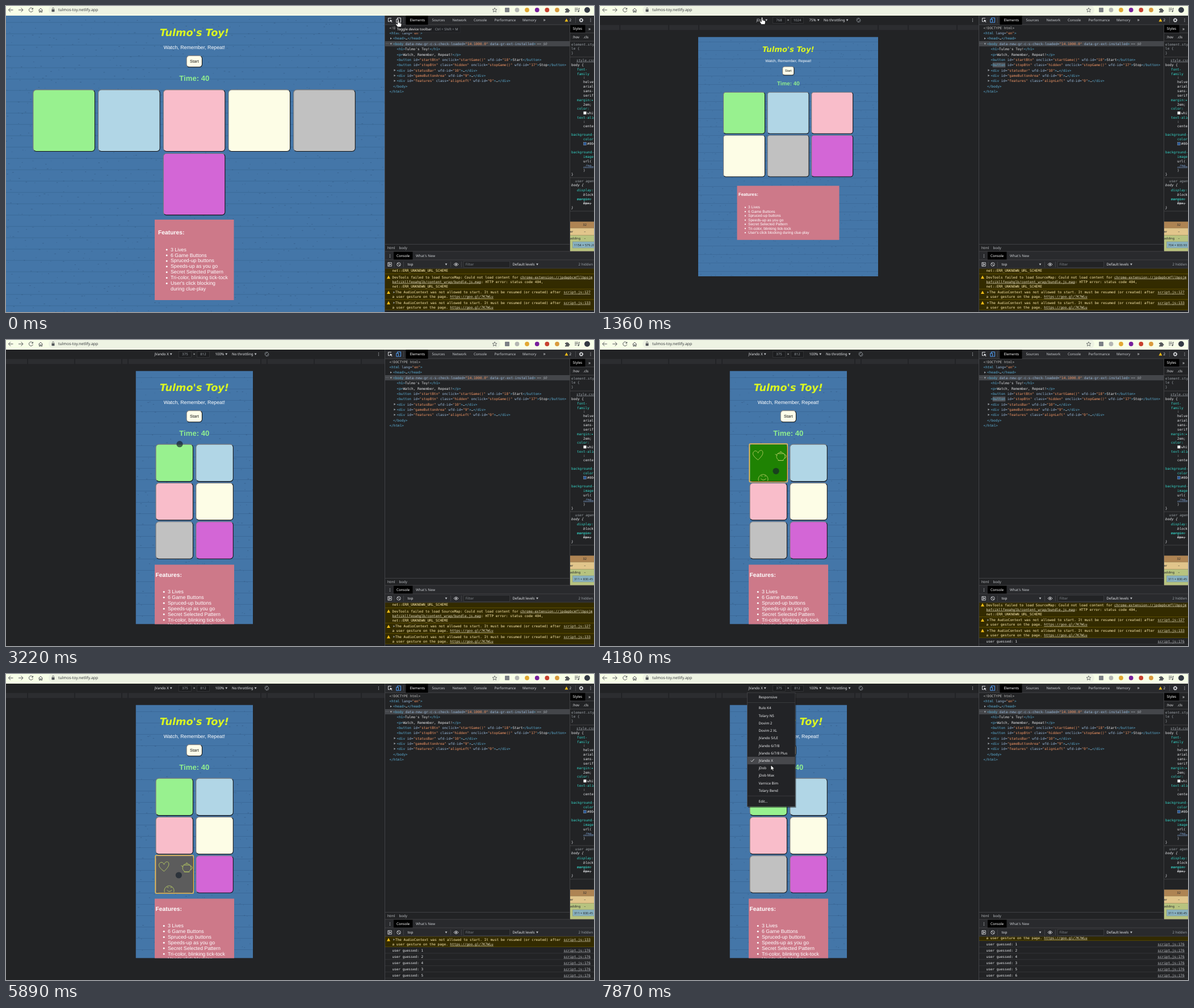
An HTML page for the animation above (7990 ms loop, 1036 px wide and 540 px high).

```html
<!DOCTYPE html>
<html lang="en">
<head>
<meta charset="utf-8">
<title>Responsive toy</title>
<style>
html, body { margin: 0; width: 100%; height: 100%; overflow: hidden; background: #222325; }
svg { display: block; }
text { white-space: pre; text-rendering: geometricPrecision; }
.ui { font-family: "Noto Sans", "Open Sans", sans-serif; }
.mono { font-family: "DejaVu Sans Mono", monospace; }
.page { font-family: "Liberation Sans", Arial, sans-serif; }
.title { font: italic bold 17.6px "DejaVu Sans", sans-serif; }
</style>
</head>
<body>
<svg id="stage" width="1036" height="540" viewBox="0 0 1036 540">
  <defs>
    <linearGradient id="edge" x1="0" y1="0" x2="1" y2="1">
      <stop offset=".5" stop-color="#77777a"/><stop offset=".5" stop-color="#101216"/>
    </linearGradient>
  </defs>
</svg>
<script>
const LOOP = 7990, BG = '#222325', BAR = '#292a2d', LINE = '#47484b', GREY = '#9aa0a6', LIGHT = '#e6e8eb';
const stage = document.getElementById('stage');

function el(tag, attrs, parent = stage) {
  const n = document.createElementNS('http://www.w3.org/2000/svg', tag);
  for (const k in attrs) n.setAttribute(k, attrs[k]);
  return parent.appendChild(n);
}
const group = (parent, attrs = {}) => el('g', attrs, parent);
const rect = (p, x, y, width, height, fill, more) => el('rect', { x, y, width, height, fill, ...more }, p);
const line = (p, d, stroke, w = .8, more) => el('path', { d, stroke, 'stroke-width': w, fill: 'none', ...more }, p);
const shape = (p, d, fill, more) => el('path', { d, fill, ...more }, p);
const dot = (p, cx, cy, r, fill, more) => el('circle', { cx, cy, r, fill, ...more }, p);
// y is the middle of the line of text
function text(p, x, y, str, size, fill, more) {
  const t = el('text', { x, y: y + size * .355, 'font-size': size, fill, ...more }, p);
  t.textContent = str;
  return t;
}
const ui = (p, x, y, str, fill = LIGHT, size = 6.2, more) => text(p, x, y, str, size, fill, { class: 'ui', ...more });
const mono = (p, x, y, str, fill, more) => text(p, x, y, str, 6.05, fill, { class: 'mono', ...more });
const caret = (p, x, y) => shape(p, `M${x - 1.9} ${y - 1.6}h3.8l-1.9 3.4z`, '#c4c7cb');
const dots = (p, x, y, c = '#b8bbbf') => [-2.4, 0, 2.4].forEach(d => dot(p, x, y + d, .7, c));
const show = (n, on) => n.setAttribute('visibility', on ? 'inherit' : 'hidden');
function random(seed) {
  return () => (seed = seed * 16807 % 2147483647) / 2147483647;
}

// ---------- the toy page ----------
const COLORS = ['#98f18f', '#b1d6e6', '#f9bdca', '#fdfde6', '#c1c1c1', '#d366d6'];
const PRESSED = ['#1f8203', '#2b35ff', '#f5202c', '#fbff14', '#5c5c5c', '#8c0a92'];
const FEATURES = ['3 Lives', '6 Game Buttons', 'Spruced-up buttons', 'Speeds-up as you go',
  'Secret Selected Pattern', 'Tri-color, blinking tick-tock'];
const BLOCK = ["User's click blocking", 'during clue-play'];

const PAGES = [
  { x: 0, y: 17, w: 667.5, h: 523, s: 1, rows: [46.5, 73, 97.7, 127], size: 109.6,
    cell: i => i < 5 ? [47.4 + 114.7 * i, 147.4] : [276.8, 259.8],
    box: [262, 377, 139.5, 142], head: [268, 399.3], list: [290, 429.5], end: BLOCK },
  { x: 173, y: 54.5, w: 317, h: 422.5, s: .75, rows: [76.2, 96.3, 114.5, 136.3], size: 74,
    cell: i => [217 + 77.6 * (i % 3), 151.7 + 76 * (i / 3 | 0)],
    box: [241.5, 317.3, 180, 95.5], head: [244, 332], list: [261, 355], end: [BLOCK.join(' ')] },
  { x: 228.5, y: 54.5, w: 206.5, h: 447, s: 1, rows: [83.5, 110, 134.7, 164], size: 66.5,
    cell: i => [263.5 + 70.8 * (i % 2), 183.6 + 68.3 * (i >> 1)],
    box: [262, 396.5, 140, 130], head: [263.5, 414], list: [285, 443.8], end: BLOCK }
];

function wood(p, { x, y, w, h, s }) {
  const rnd = random(77), gap = 20 * s;
  let grain = '', specks = '';
  for (let ly = y + gap * .6; ly < y + h; ly += gap) {
    grain += `M${x} ${ly}h${w}`;
    for (let lx = x + rnd() * 12; lx < x + w; lx += (3 + rnd() * 22) * s) {
      const len = (.5 + rnd() * 2.5) * s;
      specks += `M${lx.toFixed(1)} ${(ly + (rnd() - .35) * gap * .8).toFixed(1)}h${len.toFixed(1)}`;
    }
  }
  line(p, grain, '#2c527c', .7 * s, { opacity: .5 });
  line(p, specks, '#2a4a72', .8 * s, { opacity: .55 });
}

function slab(p, x, y, w, h, r, fill) {
  return rect(p, x + .5, y + .5, w - 1, h - 1, fill, { rx: r, stroke: 'url(#edge)', 'stroke-width': 1.1 });
}

function doodles(p, x, y, c) {
  const g = group(p, { transform: `translate(${x} ${y})`, stroke: c, 'stroke-width': .9, fill: 'none' });
  el('path', { d: 'M15 28C8 23 4 18 7 14c3-4 7-1 8 2 1-4 6-7 8-3 2 5-3 10-8 15z' }, g);
  el('path', { d: 'M49 17h12c3 6 1 9-3 12h-6c-4-3-6-6-3-12zM49 20l-4-2M61 19c5-1 5 6 0 6M50 17c1-3 9-3 10 0M54 14a1 1 0 0 1 2 0M50 29h10' }, g);
  el('path', { d: 'M16 65a8.5 8.5 0 1 1 16 0M20 57q1-2 3 0M26 57q1-2 3 0M20 61q4 5 9 0' }, g);
}

function buildPage(o) {
  const root = group(stage);
  const p = group(el('svg', { x: o.x, y: o.y, width: o.w, height: o.h, viewBox: `${o.x} ${o.y} ${o.w} ${o.h}` }, root), { class: 'page' });
  const { s, rows } = o, mid = { 'text-anchor': 'middle' }, cx = 331.8;
  rect(p, o.x, o.y, o.w, o.h, '#4476a8');
  wood(p, o);
  const t = el('text', { class: 'title', x: 0, y: 0, fill: '#dbf722', ...mid,
    transform: `translate(${cx} ${rows[0] + 6.4 * s}) scale(${s})` }, p);
  t.textContent = "Tulmo's Toy!";
  text(p, cx, rows[1], 'Watch, Remember, Repeat!', 8.8 * s, '#fff', mid);
  slab(p, cx - 14.2 * s, rows[2] - 10.6 * s, 28.4 * s, 21.2 * s, 5 * s, '#fefeea');
  text(p, cx, rows[2], 'Start', 7.33 * s, '#111', mid);
  text(p, cx, rows[3], 'Time: 40', 13.1 * s, '#90ee90', { 'font-weight': 'bold', ...mid });
  const cells = COLORS.map((c, i) => {
    const [x, y] = o.cell(i), n = o.size;
    slab(p, x, y, n, n, 5.5 * s, c);
    const hot = group(p), focus = group(p);
    if (o === PAGES[2]) {
      rect(hot, x + 1, y + 1, n - 2, n - 2, PRESSED[i], { rx: 3 });
      doodles(hot, x, y, i === 3 ? '#e6dc2c' : '#b7cb62');
      rect(focus, x - .3, y - .3, n + .6, n + .6, 'none', { rx: 1.5, stroke: '#f3bd4c', 'stroke-width': 1.5 });
    }
    return { hot, focus };
  });
  rect(p, ...o.box, '#cd7989');
  text(p, ...o.head, 'Features:', 10.3 * s, '#fff', { 'font-weight': 'bold' });
  [...FEATURES, ...o.end].forEach((f, i) => {
    const y = o.list[1] + i * 9.92 * s;
    text(p, o.list[0], y, f, 8.8 * s, '#fff');
    if (i < 7) dot(p, o.list[0] - 6.8 * s, y + .6 * s, 1.5 * s, '#fff');
  });
  return { root, cells };
}

// ---------- device toolbar ----------
function deviceBar(name, nameX, size, zoom, zoomX, throttleX, iconX, ticks) {
  const g = group(stage);
  rect(g, 0, 17, 667.5, 16, BG);
  rect(g, 0, 33.5, 667.5, 8.8, '#2c2d30');
  ticks.forEach(d => line(g, `M${332 - d} 33.5v8.8M${332 + d} 33.5v8.8`, '#191a1c', 1));
  const drop = (x, str) => {
    const t = ui(g, x, 25, str);
    caret(g, x + t.getComputedTextLength() + 4, 25);
  };
  drop(nameX, name);
  size.forEach((n, i) => {
    rect(g, 304.5 + 32 * i, 20, 22, 10.5, '#1c1d1f', { stroke: '#3a3b3e', 'stroke-width': .7 });
    ui(g, 315.5 + 32 * i, 25.2, n, GREY, 6, { 'text-anchor': 'middle' });
  });
  ui(g, 329.8, 25.2, '×', LIGHT, 6.2);
  drop(zoomX, zoom);
  drop(throttleX, 'No throttling');
  rect(g, iconX - 1.7, 22, 3.4, 6, 'none', { stroke: GREY, 'stroke-width': .8, transform: `rotate(45 ${iconX} 25)` });
  dot(g, iconX, 25, 3.7, 'none', { stroke: GREY, 'stroke-width': .7, 'stroke-dasharray': '7 4.6' });
  dots(g, 656.5, 25);
  return g;
}

// ---------- browser bar ----------
function browserBar() {
  const p = group(stage), ink = '#54575a';
  rect(p, 0, 0, 1036, 17, '#f8ffe8');
  rect(p, 75, -.7, 796, 15.4, '#eef3e3', { rx: 7.7 });
  line(p, 'M12.5 7H4.5M8 3.4L4.4 7 8 10.6M22 7h8M26.5 3.4L30.1 7 26.5 10.6', ink, 1);
  line(p, 'M47 4.8A3.6 3.6 0 1 0 47.5 8M47.5 3.4v2.4h-2.4M57.5 7.5L61 4l3.5 3.5M58.6 7v4h1.7V8.5h1.6V11h1.7V7', ink, 1);
  rect(p, 80.5, 6, 5, 4.2, ink, { rx: .6 });
  line(p, 'M81.6 6V4.5a1.4 1.4 0 0 1 2.8 0V6', ink, .8);
  ui(p, 92, 7, 'tulmos-toy.netlify.app', '#3a3d40', 6.9);
  line(p, 'M861 3.2l1.1 2.6 2.8.2-2.1 1.8.7 2.8-2.5-1.5-2.5 1.5.7-2.8-2.1-1.8 2.8-.2z', ink, .8);
  rect(p, 879, 3, 8, 8, '#7d8186', { rx: 1 });
  dot(p, 900.5, 7, 3.9, '#b4b6b3');
  dot(p, 918, 7, 3.9, '#e2a832');
  dot(p, 935.7, 7, 3.9, '#78209c');
  dot(p, 953.3, 7, 3.9, '#c8412f');
  dot(p, 971, 7, 3.9, '#d99a3d');
  shape(p, 'M985 5h2.2a1.3 1.3 0 1 1 2.6 0h2v2.1a1.3 1.3 0 1 1 0 2.5V11.500h-6.800V9.600a1.300 1.300 0 1 0 0-2.500z', ink);
  line(p, 'M1002 4h6M1002 6.5h6M1002 9h3.5M1009.5 4v5.5M1009.5 4h1.5', ink, 1);
  dot(p, 1008.5, 9.5, 1.2, ink);
  dot(p, 1024, 7, 5, '#343a44');
}

// ---------- developer tools ----------
const TREE = [
  [675.5, '<html lang="en">'], [682, '<head>…</head>', 1],
  [682, '<body data-new-gr-c-s-check-loaded="14.1000.0" data-gr-ext-installed>', 2],
  [688.5, "<h1>Tulmo's Toy!</h1>"], [688.5, '<p>Watch, Remember, Repeat!</p>'],
  [688.5, '<button id="startBtn" onclick="startGame()" wfd-id="18">Start</button>'],
  [688.5, '<button id="stopBtn" class="hidden" onclick="stopGame()" wfd-id="17">Stop</button>'],
  [688.5, '<div id="statusBar" wfd-id="10">…</div>', 1], [688.5, '<div id="gameButtonArea" wfd-id="9">…</div>', 1],
  [688.5, '<div id="features" class="alignLeft" wfd-id="0">…</div>', 1],
  [682, '</body>'], [675.5, '</html>']
];

function markup(p, x, y, src) {
  const t = mono(p, x, y, '', LIGHT);
  src.split(/("[^"]*"|<\/?\w+|>|[\w-]+(?==)|data-gr-ext\S*(?=>))/).forEach((s, i) => {
    if (!s) return;
    const fill = i % 2 === 0 ? (s === '=' ? '#9bbbdc' : LIGHT) : s[0] === '"' ? '#f29766' : /[<>]/.test(s) ? '#5db0d7' : '#9bbbdc';
    el('tspan', { fill }, t).textContent = s;
  });
}

function stylesPane(p) {
  const cyan = '#35d4c7', it = { 'font-style': 'italic' }, cut = { ...it, 'text-decoration': 'line-through' };
  const under = { 'text-decoration': 'underline' };
  const put = (x, y, rows, fill, more) => rows.forEach((s, i) => mono(p, x, y + i * 7.85, s, fill, more));
  line(p, 'M993.5 33v399M993 47.5h43M993 62h43M993 90h43M993 303h43M993 362h43', LINE, .8);
  rect(p, 994, 33.5, 26.5, 13.5, '#000');
  ui(p, 998.5, 40.2, 'Styles', '#fff');
  ui(p, 1026, 40, '»', LIGHT, 8);
  ui(p, 998, 54.8, ':hov');
  ui(p, 1017, 54.8, '.cls');
  put(996, 67.5, ['element.sty', 'le {', '}'], GREY);
  mono(p, 1005, 95.5, 'style.css:1', GREY, under);
  put(996, 103.5, ['body {'], LIGHT);
  put(1006, 112, ['font-', 'family'], cyan);
  put(1017, 126.3, [':', 'helvetica', 'arial,', 'sans-', 'serif;'], LIGHT);
  put(1006, 166, ['margin:▸'], cyan);
  put(1017, 173.7, ['2em;'], LIGHT);
  put(1006, 181, ['color:'], cyan);
  rect(p, 1017.5, 186.3, 5, 5, '#fff');
  put(1024, 188.7, ['white;'], LIGHT);
  put(1006, 196.5, ['text-align'], cyan);
  put(1017, 204.3, [':', 'center;'], LIGHT);
  put(996, 227.3, ['background-'], cyan);
  put(1017, 235.3, ['color:'], cyan);
  rect(p, 1017.5, 240.5, 5, 5, '#2a5a9a', { stroke: GREY, 'stroke-width': .5 });
  put(1024, 243, ['#004'], LIGHT);
  put(996, 258, ['background-'], cyan);
  put(1017, 266, ['image:'], cyan);
  put(1017, 273.8, ['url('], LIGHT);
  put(1017, 281.7, ['./no…'], '#8fb8f0', under);
  put(1017, 289.5, [')'], LIGHT);
  put(996, 297, ['}'], LIGHT);
  put(1003, 308.5, ['user agent'], GREY, it);
  put(996, 316.3, ['body {'], LIGHT, it);
  put(1006, 324.6, ['display:'], cyan, it);
  put(1017, 332.5, ['block;'], LIGHT, it);
  put(1006, 340.4, ['margin:'], cyan, cut);
  put(1017, 348.2, ['0px;'], LIGHT, cut);
  put(996, 356, ['}'], LIGHT, it);
  const small = (x, y, s) => ui(p, x, y, s, '#26282b', 5.6);
  rect(p, 994, 380.5, 42, 52, '#ae8453');
  rect(p, 994, 392, 42, 41, '#e1c58b');
  rect(p, 994, 404.5, 42, 28, '#b7c37f');
  rect(p, 998.5, 416, 38, 11, '#89b1c0', { stroke: '#7c8f86', 'stroke-width': .6 });
  line(p, 'M994 392h42M994 404.5h42', '#8a7850', .5);
  small(1016.5, 386.5, '32');
  small(993.8, 398.3, 'er');
  small(1018.5, 398.3, '–');
  small(993.8, 410, 'adding');
  small(1018.5, 410, '–');
  return small(1001, 421.7, '');
}

function devTools() {
  const p = group(stage);
  rect(p, 667.5, 17, 368.5, 523, BG);
  rect(p, 667.5, 17, 368.5, 16, BAR);
  line(p, 'M667.5 17v523M668 33h368M700.5 20v10M1003.5 20v10', LINE, .9);
  line(p, 'M679 21.5h-5.5v6h2.5', LIGHT, .9);
  shape(p, 'M676.5 24l4.2 1.7-1.8.8 1.6 2-.8.6-1.6-2-1.3 1.4z', LIGHT);
  const device = group(p, { stroke: GREY, fill: 'none', 'stroke-width': 1 });
  el('path', { d: 'M689.5 23v-2h6v8h-3M687.8 23.5h3.8v5.6h-3.8z' }, device);
  rect(p, 704.5, 17, 39, 16, '#000');
  const tabs = { Elements: 711.5, Sources: 750.5, Network: 786.5, Console: 824, Performance: 860.5, Memory: 910 };
  for (const k in tabs) ui(p, tabs[k], 25, k, k === 'Elements' ? '#fff' : '#c9ccd0');
  ui(p, 946.5, 24.5, '»', LIGHT, 8);
  shape(p, 'M987.5 22l3 5.5h-6z', '#f5bd17');
  ui(p, 992.5, 25, '2');
  dot(p, 1013.5, 25, 2.3, 'none', { stroke: LIGHT, 'stroke-width': 1.3 });
  dot(p, 1013.5, 25, 3.4, 'none', { stroke: LIGHT, 'stroke-width': 1, 'stroke-dasharray': '1.3 1.37' });
  dots(p, 1030, 25);

  rect(p, 668, 62, 325, 9.2, '#44464a');
  ui(p, 668.5, 66, '⋯', GREY, 6);
  mono(p, 675.5, 38.7, '<!DOCTYPE html>', '#c0c0c0');
  const flash = rect(p, 691.8, 99.8, 22.5, 8.6, '#505257');
  TREE.forEach(([x, src, arrow], i) => {
    const y = 48 + i * 9.35;
    if (arrow) shape(p, arrow > 1 ? `M${x - 5.5} ${y - 1.2}h3.6l-1.8 3z` : `M${x - 5} ${y - 1.9}v3.6l3-1.8z`, GREY);
    markup(p, x, y, src);
  });
  mono(p, 935.5, 66.7, '== $0', GREY, { 'font-style': 'italic' });
  const metric = stylesPane(p);

  rect(p, 668, 421, 325, 12, BG);
  line(p, 'M668 420.5h325', LINE);
  ui(p, 672, 427, 'html', '#b9bcc0');
  ui(p, 692.5, 427, 'body', '#b9bcc0');
  rect(p, 668, 433, 368, 15, BAR);
  rect(p, 683, 433.5, 33.5, 14.5, '#000');
  dots(p, 676.5, 441);
  ui(p, 688, 441, 'Console', '#fff');
  ui(p, 722, 441, "What's New", '#c9ccd0');
  rect(p, 668, 448, 368, 15, BAR);
  line(p, 'M668 433h368M668 448h368M668 463h368M684 451v10M700.5 451v10M783.5 451v10M802.5 451v10', LINE);
  line(p, 'M672.8 452.8h6.6v6.4h-6.6zM674.8 452.8v6.4', LIGHT, .8);
  shape(p, 'M676 454.3v3.4l2.4-1.7z', LIGHT);
  dot(p, 692, 456, 3.2, 'none', { stroke: LIGHT, 'stroke-width': .8 });
  line(p, 'M689.8 453.8l4.4 4.4', LIGHT);
  ui(p, 707.5, 456, 'top');
  caret(p, 775.5, 456);
  line(p, 'M789 456q4-5 8 0q-4 5-8 0z', LIGHT);
  dot(p, 793, 456, 1.3, LIGHT);
  rect(p, 806.5, 450.5, 81, 11, BG, { stroke: '#3c3d40', 'stroke-width': .8 });
  ui(p, 809.5, 456, 'Filter', '#80868b');
  ui(p, 892.5, 456, 'Default levels');
  caret(p, 936, 456);
  ui(p, 1008.5, 456, '2 hidden', GREY);
  return { device, flash, metric };
}

function consoleLog() {
  const win = el('svg', { x: 668, y: 463.5, width: 368, height: 76.5, viewBox: '668 463.5 368 76.5' }, stage);
  const p = group(win), warm = '#ffecb0', link = '#e4dcc0', under = { 'text-decoration': 'underline' };
  const warn = (y, h, lines, file) => {
    rect(p, 668, y, 368, h, '#332b00');
    line(p, `M668 ${y}h368M668 ${y + h}h368`, '#665500', .7);
    shape(p, `M674 ${y + 2.8}l3 5.6h-6z`, '#f5bd17');
    lines.forEach((s, i) => mono(p, file && !i ? 686 : 680.5, y + 5.6 + i * 8, s, warm));
    if (!file) return;
    shape(p, `M682.5 ${y + 3.9}v3.6l2.6-1.8z`, GREY);
    mono(p, 982.5, y + 5.6, 'script.js:' + file, link, under);
    mono(p, 782.3, y + 13.6, 'https://goo.gl/7K7WLu', link, under);
  };
  const net = 'net::ERR_UNKNOWN_URL_SCHEME';
  const audio = ['The AudioContext was not allowed to start. It must be resumed (or created) after', 'a user gesture on the page.'];
  warn(445.5, 27.3, ['', '', net]);
  warn(472.8, 26.8, ['DevTools failed to load SourceMap: Could not load content for', '', net]);
  mono(p, 906, 478.4, 'chrome-extension://jpdapbcmfllbpojm', link, under);
  mono(p, 680.5, 486.4, 'kefcikllfeoahglb/content_wrap/bundle.js.map', link, under);
  mono(p, 837.2, 486.4, ': HTTP error: status code 404,', warm);
  warn(499.6, 18.4, audio, 127);
  warn(518, 18.4, audio, 133);
  const rows = [1, 2, 4, 3, 5, 6].map((n, i) => {
    const g = group(p), y = 542.5 + i * 11;
    mono(g, 680.5, y, 'user guessed: ' + n, LIGHT);
    mono(g, 982.5, y, 'script.js:176', '#b9bcc0', under);
    line(g, `M668 ${y + 5.3}h368`, '#3b3c3f', .7);
    return g;
  });
  return { list: p, rows };
}

// ---------- device menu ----------
const DEVICES = ['Rulo K4', 'Tolary N5', 'Dovim 2', 'Dovim 2 XL', 'jVando 5/LE', 'jVando 6/7/8', 'jVando 6/7/8 Plus',
  'jVando X', 'jDob', 'jDob Max', 'Varnice Bim', 'Tolary Bend'];
const ROW = 13.22, rowY = i => 60.2 + i * ROW;

function deviceMenu(x, checked) {
  const g = group(stage);
  rect(g, x + 1.5, 35, 84.5, 201, '#000', { opacity: .4 });
  rect(g, x, 33, 84.5, 201, '#222326', { stroke: '#4a4b4e', 'stroke-width': .7 });
  const hover = rect(g, x + .5, 0, 83.5, 13.2, '#47484c');
  line(g, `M${x} 50.5h84.5M${x} 215.2h84.5`, '#434447', .7);
  ['Responsive', ...DEVICES, 'Edit…'].forEach((s, i) =>
    ui(g, x + 20, i === 0 ? 41.2 : i === 13 ? 225 : rowY(i - 1), s, '#f0f1f3'));
  const y = rowY(checked);
  line(g, `M${x + 6} ${y}l2 2 4-4.5`, LIGHT, .9);
  return { g, hover };
}

// ---------- assembly ----------
const pages = PAGES.map(buildPage);
const bars = [
  deviceBar('jDob', 275.5, [768, 1024], '75%', 368.5, 394, 455.5, [158, 211, 297]),
  deviceBar('jVando X', 261.5, [375, 812], '100%', 368.5, 398, 459.5, [117, 128, 211, 294])
];
const tools = devTools();
const log = consoleLog();
browserBar();
const menus = [deviceMenu(272.5, 8), deviceMenu(259.5, 7)];

const tip = group(stage);
rect(tip, 686, 35, 114.5, 12, '#1f2023', { stroke: '#2f3033', 'stroke-width': .6 });
ui(tip, 688.7, 41, 'Toggle device toolbar', '#fff', 6.1);
ui(tip, 756, 41, 'Ctrl + Shift + M', GREY, 5.9);

const cursor = group(stage);
const edge = { stroke: '#000', 'stroke-width': .7, 'stroke-linejoin': 'round' };
const looks = {
  hand: shape(cursor, 'M-1.2 1a1.2 1.2 0 0 1 2.4 0v4l3.6 1q1.4.5 1.2 2l-.8 4.5H-1.2L-4.2 8q-.6-1.4.8-1.5l2.2 1.3z', '#fff', edge),
  arrow: shape(cursor, 'M0 0v9l2.1-1.9 1.5 3.2 1.5-.7L3.7 6.5h2.8z', '#fff', edge),
  touch: dot(cursor, 0, 0, 5.6, '#16202c', { opacity: .68 })
};

// time, x, y, look
const PATH = [
  [0, 691, 24.5, 'hand'], [530, 691, 24.5, 'arrow'], [1300, 285.5, 20, 'hand'], [1700, 285.5, 20, 'arrow'],
  [2530, 316, 174.5, 'arrow'], [2560, 316, 174.5, 'arrow'], [2680, 300, 155, 'arrow'], [2800, 300, 155, 'touch'],
  [3760, 314, 222, 'touch'], [4100, 310, 231.3, 'touch'], [4500, 310, 231.3, 'touch'], [4720, 365, 228, 'touch'],
  [4900, 365, 228, 'touch'], [5130, 366, 290, ''], [5330, 366, 290, 'touch'], [5470, 302, 288, 'touch'],
  [5620, 302, 288, 'touch'], [5760, 300, 355, 'touch'], [5890, 300, 355, 'touch'], [6020, 366, 355, 'touch'],
  [6150, 366, 355, 'touch'], [6520, 230, 84, 'touch'], [6570, 230, 84, 'touch'], [6670, 240, 55.5, 'touch'],
  [6800, 270, 36, 'arrow'], [6950, 281, 25, 'hand'], [7250, 281, 25, 'arrow'], [7750, 297, 144, 'arrow'],
  [7870, 301, 160.8, 'arrow']
];
// start, end and count of screen refreshes
const BURSTS = [[550, 1510, 8], [1750, 2680, 8], [2800, 3760, 8], [3880, 4450, 5], [4720, 5650, 8],
  [5770, 6670, 8], [6820, 7750, 8], [7870, 7990, 2]];
// button, press, release
const PRESSES = [[0, 4030, 4450], [1, 4720, 4970], [3, 5110, 5370], [2, 5490, 5640], [4, 5765, 5940], [5, 6020, 6250]];

function snap(t) {
  let s = 0;
  for (const [a, b, n] of BURSTS) {
    if (t < a) break;
    const d = (b - a) / (n - 1);
    s = Math.min(b, a + Math.floor((t - a) / d + .2) * d);
  }
  return s;
}

function cursorAt(t) {
  let i = 0;
  while (i < PATH.length - 1 && PATH[i + 1][0] <= t) i++;
  const a = PATH[i], b = PATH[i + 1] || a, k = b === a ? 0 : (t - a[0]) / (b[0] - a[0]);
  return [a[1] + (b[1] - a[1]) * k, a[2] + (b[2] - a[2]) * k, a[3]];
}

function draw(t) {
  const mode = t < 120 ? 0 : t < 2930 ? 1 : 2;
  pages.forEach((p, i) => show(p.root, i === mode));
  bars.forEach((b, i) => show(b, i + 1 === mode));
  show(tip, t < 270);
  tools.device.setAttribute('stroke', mode ? '#4f9df5' : LIGHT);
  show(tools.flash, t >= 1090 && t < 1500 || t >= 3600 && t < 4720);
  tools.metric.textContent = t < 270 ? '1154 × 579.28' : mode < 2 ? '704 × 833.93' : '311 × 830.45';

  const [x, y, look] = cursorAt(snap(t));
  cursor.setAttribute('transform', `translate(${x} ${y})`);
  for (const k in looks) show(looks[k], k === look);

  const open = [t >= 1500 && t < 2800, t >= 7210];
  const row = Math.round((y - 1.7 - rowY(0)) / ROW);
  menus.forEach((m, i) => {
    show(m.g, open[i]);
    show(m.hover, open[i] && row >= 0);
    m.hover.setAttribute('y', rowY(row) - ROW / 2);
  });

  const past = PRESSES.filter(p => t >= p[1]), last = past[past.length - 1];
  pages[2].cells.forEach((c, i) => {
    const mine = mode === 2 && last && last[0] === i;
    show(c.hot, mine && t < last[2]);
    show(c.focus, mine && t < 6950);
  });
  const count = PRESSES.filter(p => t >= p[1] + 70).length;
  log.rows.forEach((r, i) => show(r, i < count));
  log.list.setAttribute('transform', `translate(0 ${-11 * count})`);
}

const start = performance.now();
function tick() {
  draw((performance.now() - start) % LOOP);
  requestAnimationFrame(tick);
}
tick();
</script>
</body>
</html>
```
